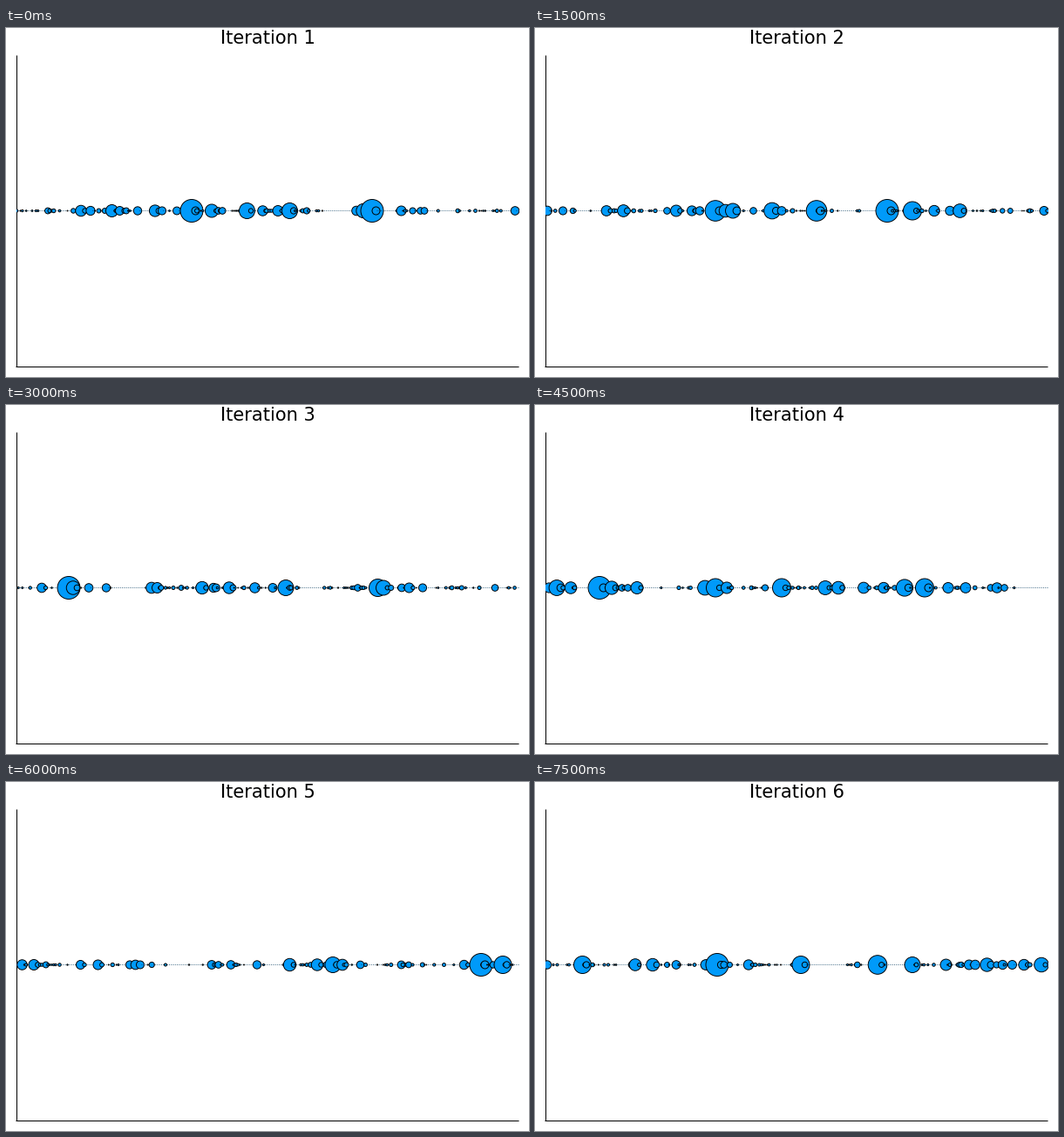
These frames come from a looping animation (600x400 px, 8 s). A matplotlib script:

```python
import numpy as np
import matplotlib.pyplot as plt
from matplotlib.animation import FuncAnimation
from matplotlib.patches import Rectangle

W, H, DPI = 600, 400, 100
PT = 72 / DPI                       # points per pixel
LEFT, RIGHT, TOP, BOTTOM, MID = 12, 588, 31, 388, 209.5
STEP = 2.25                         # spacing of the sample row
BLUE = "#009AFA"
TICK, HOLD, LOOP = 500, 1500, 8000

# Per iteration: four largest radii, falloff of the rest,
# then bubble positions from largest to smallest.
ITERATIONS = [
    ((13.5, 13.5, 9.5, 9.5), .42,
     [213, 420, 276.5, 325.5, 410, 236, 121.5, 171, 86, 312, 294.5,
      453.5, 402, 97, 130.5, 584, 151, 179, 196]),
    ((13.5, 12.3, 12.3, 11), .5,
     [404, 207, 323, 433, 272, 227, 487.5, 218.5, 101.5, 162, 458,
      82, 180, 14, 476, 584, 283, 189, 32]),
    ((13.5, 10.5, 9.5, 9), .4,
     [72, 426.5, 321, 433, 77, 225, 256, 167, 173.5, 285.5, 462.5,
      41, 238, 306, 95, 115, 478, 241, 454]),
    ((13.5, 11, 11, 11), .38,
     [74, 447, 283, 207, 424, 25, 195, 333, 88, 348, 117, 41, 220,
      377, 400, 474, 494, 530, 16]),
    ((13.5, 10.5, 9.5, 7.7), .3,
     [545, 570, 375, 325.5, 357, 386, 32, 18.5, 105.5, 148.5, 525.5,
      85.5, 236, 258, 288, 142, 154, 453.5, 406.5]),
    ((13.5, 11.3, 10.5, 10.5), .45,
     [209, 393, 305, 54.5, 433, 581, 518.5, 135, 115, 471.5, 561,
      196, 245, 498, 505, 536.5, 547.5, 162, 14]),
]


def bubbles(index):
    """Positions and radii of one iteration, sorted left to right."""
    head, falloff, xs = ITERATIONS[index]
    rng = np.random.default_rng(20 + index)
    rank = np.arange(1, len(xs) + 1)
    radii = head[-1] * (4 / rank) ** falloff
    radii[:4] = head
    found = dict(zip(xs, radii))

    def is_free(x):
        return min(abs(x - known) for known in found) > 1.2

    # a smaller neighbour just right of each big bubble
    for x, r in list(zip(xs, radii))[:13]:
        near = x + 2 * STEP
        if is_free(near) and near < RIGHT:
            found[near] = min(5, r * rng.uniform(.3, .55))

    phase = rng.uniform(0, 2 * np.pi)
    for x in np.arange(LEFT, RIGHT + 1, STEP):
        if not is_free(x):
            continue
        busy = .36 + .2 * np.sin(x / 17 + phase)
        if rng.random() < busy:
            found[x] = min(4.3, .9 + rng.exponential(1.1))
        else:
            found[x] = .5
    return np.array(sorted(found.items())).T


SCENES = [bubbles(i) for i in range(len(ITERATIONS))]

fig = plt.figure(figsize=(W / DPI, H / DPI), dpi=DPI, facecolor="white")
ax = fig.add_axes([0, 0, 1, 1])
ax.set(xlim=(0, W), ylim=(H, 0))
ax.axis("off")

frame_style = dict(color="black", lw=PT, solid_capstyle="butt")
ax.plot([LEFT - .5] * 2, [TOP, BOTTOM], **frame_style)
ax.plot([LEFT - 1, RIGHT], [BOTTOM - .5] * 2, **frame_style)
title = ax.text(W / 2, 18, "", ha="center", va="baseline",
                family="DejaVu Sans", size=21 * PT, color="black")

window = Rectangle((LEFT - .5, TOP), RIGHT - LEFT + 1, BOTTOM - TOP,
                   transform=ax.transData)
rows = []
for xs, radii in SCENES:
    dot = radii < .6
    size = np.where(dot, .7, 2 * radii - 1) * PT
    width = np.where(dot, .2, .95) * PT
    row = ax.scatter(xs, np.full(len(xs), MID), s=size ** 2, c=BLUE,
                     edgecolors="black", linewidths=width, zorder=3)
    row.set_clip_path(window)
    rows.append(row)


def draw(frame):
    current = frame * TICK // HOLD
    title.set_text(f"Iteration {current + 1}")
    for i, row in enumerate(rows):
        row.set_visible(i == current)
    return [title, *rows]


anim = FuncAnimation(fig, draw, frames=LOOP // TICK, interval=TICK,
                     init_func=lambda: draw(0), repeat=True, repeat_delay=0)
plt.show()
```
